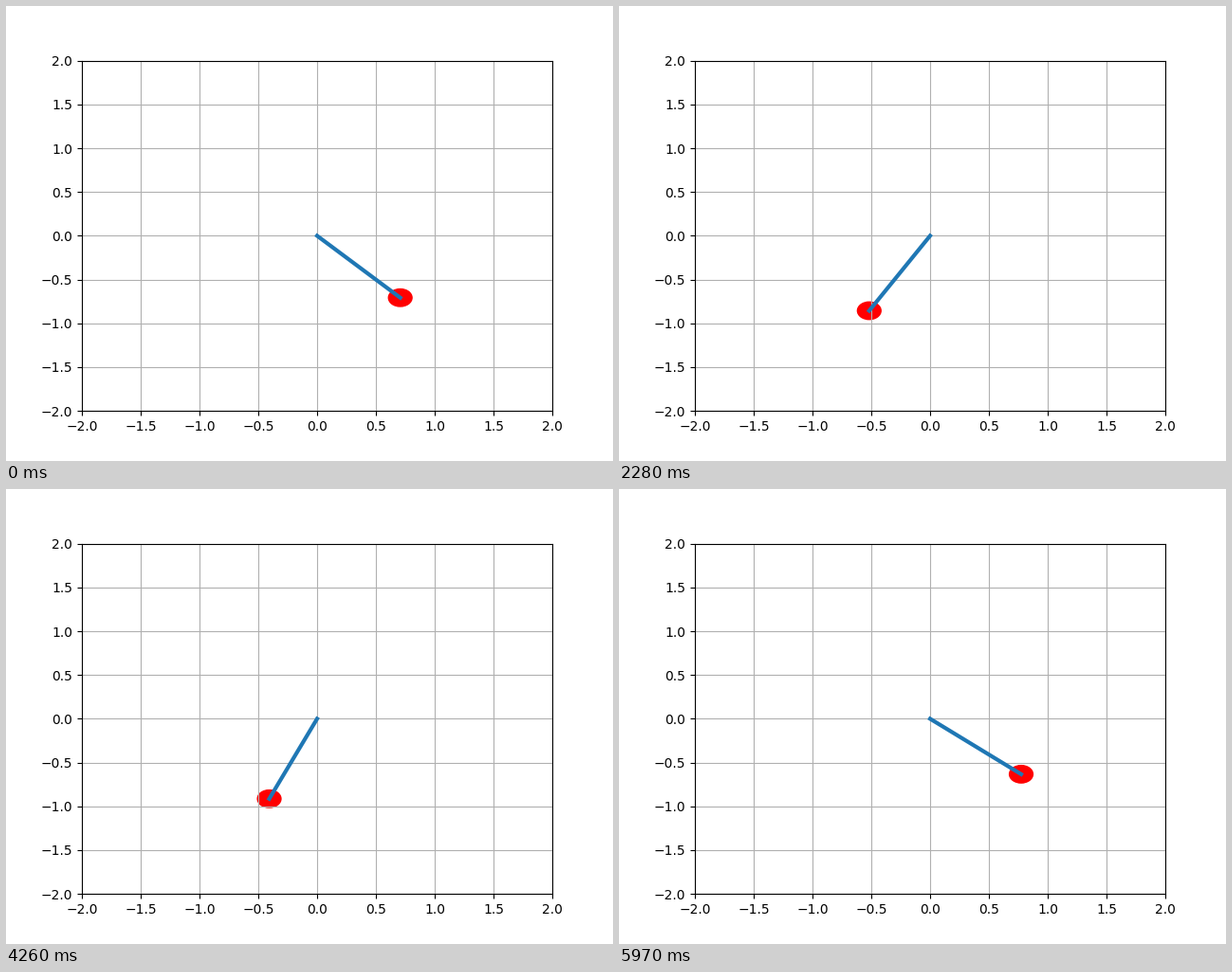
Write a matplotlib script that moves like this. It is 640 px wide and 480 px high and loops after 6 s.

```python
import numpy as np
import matplotlib.pyplot as plt
from matplotlib.animation import FuncAnimation

G = 9.81
LENGTH = 1.0
DT = 0.01
FRAMES = 200


def swing(theta, steps):
    """Angles of a pendulum whose acceleration lags one step behind."""
    omega = alpha = 0.0
    angles = []
    for _ in range(steps):
        angles.append(theta)
        theta, omega, alpha = (
            theta + omega * DT,
            omega + alpha * DT,
            -G / LENGTH * np.sin(theta),
        )
    return np.array(angles)


angles = swing(np.pi / 4, FRAMES)
xs = LENGTH * np.sin(angles)
ys = -LENGTH * np.cos(angles)

fig, ax = plt.subplots(figsize=(6.4, 4.8), dpi=100)
ax.set_xlim(-2, 2)
ax.set_ylim(-2, 2)
ax.grid(True)

rod, = ax.plot([], [], lw=3)
bob = ax.add_patch(plt.Circle((xs[0], ys[0]), 0.1, color="r"))


def update(i):
    rod.set_data([0, xs[i]], [0, ys[i]])
    bob.center = xs[i], ys[i]
    return rod, bob


anim = FuncAnimation(fig, update, frames=FRAMES, interval=30,
                     repeat=True, repeat_delay=0)
plt.show()
```
